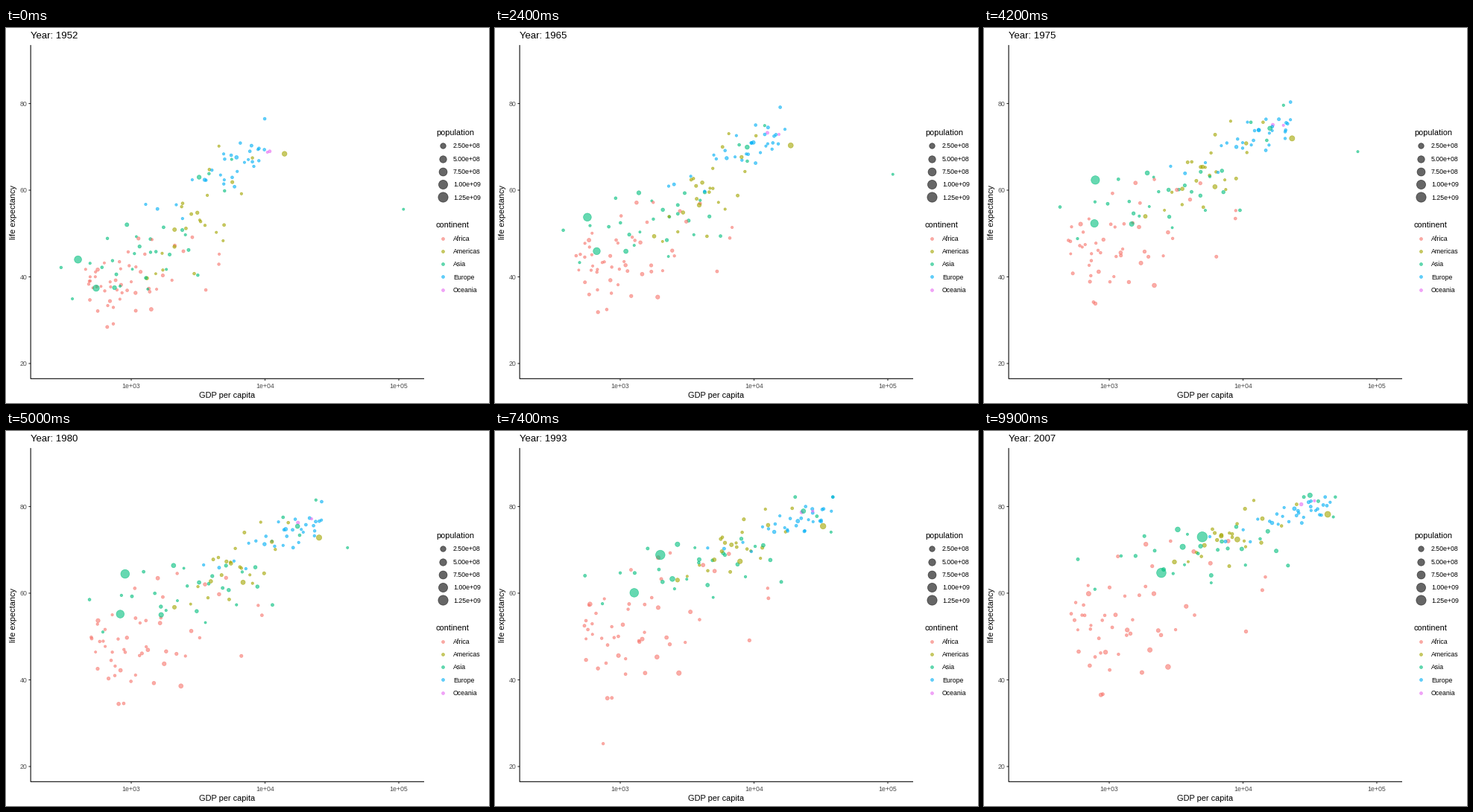
A matplotlib script that plays this animation: 648 px wide and 504 px high, repeating every 10000 ms.

```python
import numpy as np
import matplotlib.pyplot as plt
from matplotlib.animation import FuncAnimation

W, H, DPI = 648, 504, 72
FRAMES, LOOP_MS = 100, 10000
FIRST, LAST = 1952, 2007
ALPHA, STROKE = 0.6, 0.71
LEFT, RIGHT, TOP, BOTTOM = 33.1, 561, 22.9, 471.3
COLORS = {
    "Africa": "#F8766D",
    "Americas": "#A3A500",
    "Asia": "#00BF7D",
    "Europe": "#00B0F6",
    "Oceania": "#E76BF3",
}

plt.rcParams["font.family"] = ["Liberation Sans", "DejaVu Sans"]
rng = np.random.default_rng(1952)
years = np.linspace(FIRST, LAST, FRAMES)
progress = np.linspace(0, 1, FRAMES)
ease_out = 1 - (1 - progress) ** 1.5


def px(log_gdp):
    return 168 + 179.5 * (log_gdp - 3)


def py(life):
    return BOTTOM - (life - 16.5) * (BOTTOM - TOP) / 77


def point_size(millions):
    """Area scale from population to a point size between 1 and 6."""
    return 1 + 5 * np.sqrt(np.clip(millions / 1319, 0, 1))


def marker_area(size):
    return (0.75 * (2.845 * size + 0.945)) ** 2


# Each bubble is (log GDP over time, life over time, size over time, colour).
bubbles = []


def add(continent, log_gdp, life, pop, growth):
    start, end = point_size(pop), point_size(pop * growth)
    size = start + (end - start) * progress
    bubbles.append((log_gdp, life, size, COLORS[continent]))


def track(continent, pop, growth, *keys):
    """A bubble that moves straight between (year, GDP, life) keys."""
    year, gdp, life = np.array(keys, float).T
    add(continent, np.interp(years, year, np.log10(gdp)),
        np.interp(years, year, life), pop, growth)


def spread(n):
    """Evenly filled bell-shaped scores in random order."""
    p = (np.arange(n) + 0.5) / n
    return rng.permutation(np.clip(np.log(p / (1 - p)) / 1.7, -1.95, 1.95))


def wobble(scale):
    """Drift that takes a new value every five years."""
    knots = np.linspace(FIRST, LAST, 12)
    return np.interp(years, knots, rng.normal(0, scale, knots.size))


def cloud(continent, n, growth, rho, skew, *ranges):
    """Skewed cloud; ranges give start and end of its centres and spreads."""
    gx, sx, gy, sy = (a + (b - a) * ease_out for a, b in ranges)
    for u, v in zip(spread(n), spread(n)):
        u += skew * (u * u - 1)
        w = rho * u + np.sqrt(1 - rho * rho) * v
        log_gdp = gx + sx * u + wobble(0.025)
        life = gy + sy * w + wobble(0.5)
        pop = min(rng.lognormal(1.9, 1), 60)
        add(continent, np.minimum(log_gdp, 4.69), np.minimum(life, 82.2),
            pop, growth)


cloud("Africa", 50, 3.2, 0.3, 0.25,
      (2.99, 3.18), (0.25, 0.37), (39.2, 54.8), (4.9, 8.6))
cloud("Americas", 23, 2.3, 0.7, 0,
      (3.50, 3.91), (0.20, 0.22), (53, 73.3), (8.5, 3.9))
cloud("Asia", 28, 2.8, 0.65, 0,
      (3.12, 3.75), (0.32, 0.50), (46.5, 70.7), (7.8, 6.4))
cloud("Europe", 30, 1.25, 0.85, -0.25,
      (3.71, 4.36), (0.23, 0.22), (64.8, 77.7), (5.6, 2.9))
cloud("Oceania", 2, 2.1, 0.9, 0,
      (4.01, 4.47), (0.02, 0.08), (69.2, 80.7), (0.2, 0.7))
rng.shuffle(bubbles)

# The most populous bubbles and two outliers follow their own paths.
track("Asia", 1, 2.5, (1952, 108382, 55.6), (1972, 109348, 67.7),
      (1982, 31354, 71.3), (2007, 47307, 77.6))
track("Asia", 86, 1.5, (1952, 3217, 63), (1972, 14779, 73.4),
      (2007, 31656, 82.6))
track("Asia", 82, 2.7, (1952, 750, 37.5), (1992, 2383, 62.7),
      (2007, 3541, 70.7))
track("Africa", 33, 4, (1952, 1077, 36.3), (1972, 1698, 42.8),
      (2007, 2014, 46.9))
track("Africa", 2.5, 3.5, (1952, 493, 40), (1987, 848, 44),
      (1992, 737, 23.6), (2007, 863, 46.2))
track("Americas", 57, 3.3, (1952, 2109, 50.9), (1977, 6660, 61.5),
      (2007, 9066, 72.4))
track("Americas", 158, 1.9, (1952, 13990, 68.4), (1972, 21806, 71.3),
      (2007, 42952, 78.2))
track("Asia", 372, 3, (1952, 547, 37.4), (1982, 856, 56.6),
      (2002, 1747, 62.9), (2007, 2452, 64.7))
track("Asia", 556, 2.4, (1952, 400, 44), (1957, 576, 50.5),
      (1962, 488, 44.5), (1967, 613, 58.4), (1982, 962, 65.5),
      (2007, 4959, 73))

log_gdp, life, sizes = (np.array([b[k] for b in bubbles]).T for k in range(3))
xy = np.dstack([px(log_gdp), py(life)])
areas = marker_area(sizes)

# Stage in pixel coordinates, origin at the top left.
fig = plt.figure(figsize=(W / DPI, H / DPI), dpi=DPI, facecolor="white")
ax = fig.add_axes([0, 0, 1, 1])
ax.set(xlim=(0, W), ylim=(H, 0))
ax.axis("off")


def line(x, y, color):
    ax.plot(x, y, color=color, lw=1.07, solid_capstyle="butt", snap=False)


def label(x, y, text, size=8.8, color="black", **kw):
    return ax.text(x, y, text, fontsize=size, color=color,
                   va="baseline", **kw)


def dots(x, y, area, color):
    return ax.scatter(x, y, s=area, c=color, edgecolors=color,
                      linewidths=STROKE, alpha=ALPHA, snap=False)


cloud_dots = dots(*xy[0].T, areas[0], [b[3] for b in bubbles])

for power in (3, 4, 5):
    x = px(power)
    line([x, x], [BOTTOM, BOTTOM + 2.75], "#333333")
    label(x, 484, f"1e+0{power}", color="#4D4D4D", ha="center")
for value in (20, 40, 60, 80):
    y = py(value)
    line([LEFT - 2.75, LEFT], [y, y], "#333333")
    label(28.2, y + 3.2, value, color="#4D4D4D", ha="right")
line([LEFT, LEFT, RIGHT], [TOP, BOTTOM, BOTTOM], "black")

label((LEFT + RIGHT) / 2, 496.6, "GDP per capita", 11, ha="center")
label(13, (TOP + BOTTOM) / 2, "life expectancy", 11, ha="center",
      rotation=90, rotation_mode="anchor")
title = label(LEFT, 14.3, "", 13.2)


def legend(heading, top, entries):
    label(576.8, top, heading, 11)
    for k, (text, size, color) in enumerate(entries):
        y = top + 14.5 + 17.28 * k
        dots([586], [y], marker_area(size), color)
        label(600, y + 3.1, text)


legend("population", 143.8,
       [(f"{m * 1e6:.2e}", point_size(m), "black")
        for m in range(250, 1251, 250)])
legend("continent", 266.9 + 1.2,
       [(name, 1.5, color) for name, color in COLORS.items()])


def update(i):
    cloud_dots.set_offsets(xy[i])
    cloud_dots.set_sizes(areas[i])
    title.set_text(f"Year: {round(years[i])}")
    return cloud_dots, title


anim = FuncAnimation(fig, update, frames=FRAMES, interval=LOOP_MS / FRAMES,
                     repeat=True, repeat_delay=0)
plt.show()
```
